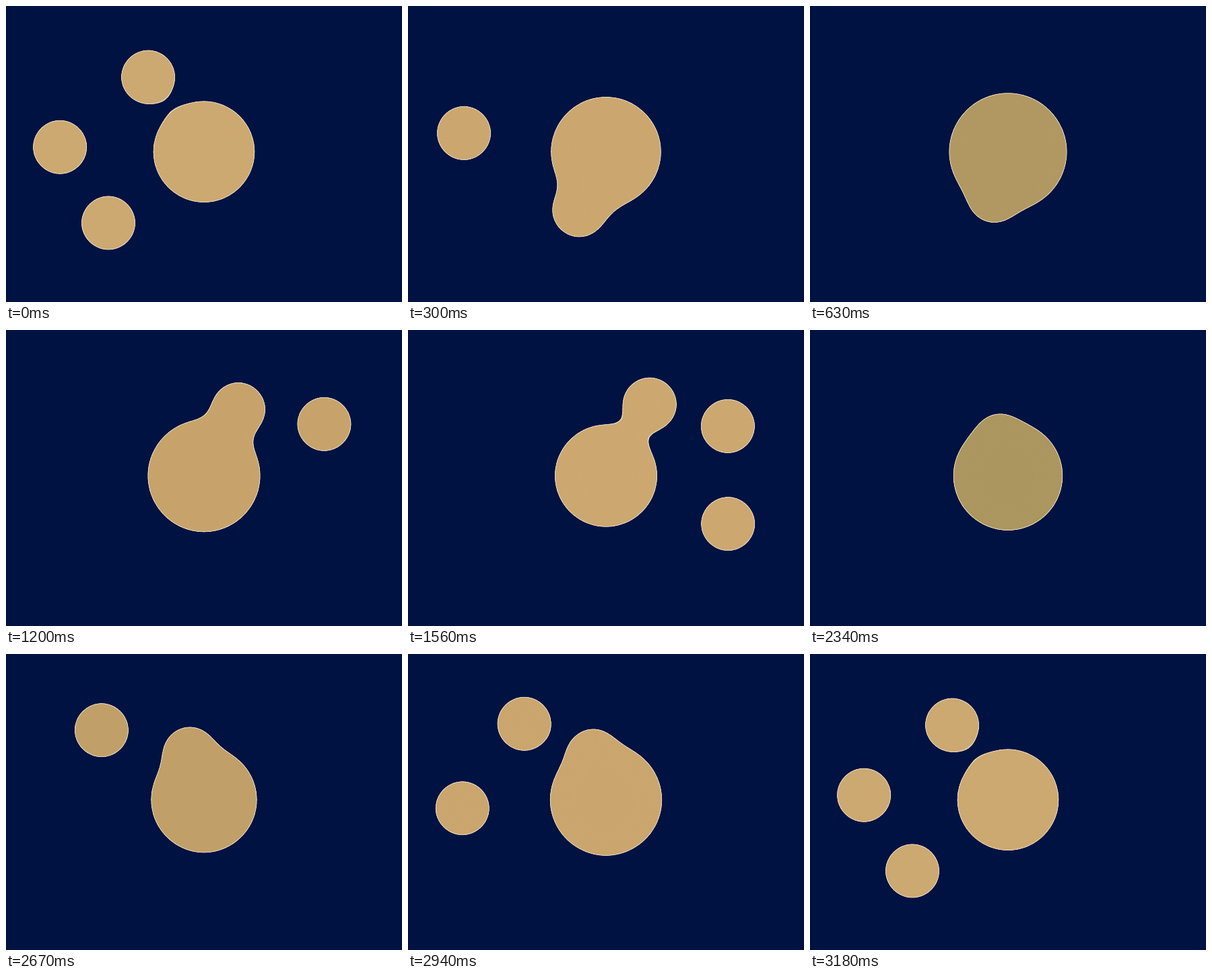
An HTML page for the animation above (3210 ms loop, 588 by 440 pixels).

```html
<!DOCTYPE html>
<html lang="en">
<head>
<meta charset="utf-8">
<title>Gooey orbit</title>
<style>
  html, body { margin: 0; width: 100%; height: 100%; overflow: hidden; background: #001242; }
  svg { display: block; }
</style>
</head>
<body>
<svg width="588" height="440" viewBox="0 0 588 440">
  <!-- Blur, then cut the alpha twice: a pale rim just outside the body -->
  <filter id="goo" filterUnits="userSpaceOnUse" x="0" y="0" width="588" height="440"
          color-interpolation-filters="sRGB">
    <feGaussianBlur stdDeviation="15" result="soft"/>
    <feColorMatrix in="soft" result="rim"
      values="0 0 0 0 .92  0 0 0 0 .86  0 0 0 0 .74  0 0 0 60 -27.9"/>
    <feColorMatrix in="soft" result="body"
      values="1 0 0 0 0  0 1 0 0 0  0 0 1 0 0  0 0 0 60 -29.5"/>
    <feMerge><feMergeNode in="rim"/><feMergeNode in="body"/></feMerge>
  </filter>
  <g id="blobs" filter="url(#goo)">
    <circle id="core" cx="294" cy="216.7"/>
    <circle class="ball" r="41.7"/>
    <circle class="ball" r="41.7"/>
    <circle class="ball" r="41.7"/>
  </g>
</svg>
<script>
const LOOP = 3210, STEP = 30, CYCLE = LOOP - STEP, HALF = CYCLE / 2;

// Each ball rounds the right lobe, then the left one; a higher power starts slower
const trips = [
  { power: 1, right: { start: 595, span: 1580 }, left: { start: 2239, span: 1350 } },
  { power: 2, right: { start: 519, span: 1670 }, left: { start: 2246, span: 1332 } },
  { power: 3, right: { start: 525, span: 1800 }, left: { start: 2155, span: 1714 } }
];

const mod = (a, n) => ((a % n) + n) % n;
const bump = (t, peak, width) => Math.exp(-(((t - peak) / width) ** 2));

function progress(trip, t) {
  const u = mod(t - trip.start, CYCLE) / trip.span;
  return u < 1 ? u : 0;
}

// Lobes are ellipses that touch at the core; angle 0 is the core, going up first
function place({ power, right, left }, t) {
  const r = progress(right, t), l = progress(left, t);
  const angle = 2 * Math.PI * Math.max(r, l) ** power;
  const reach = r > l ? 102.5 : -107;
  return [294 + reach * (1 - Math.cos(angle)), 215.7 - 113 * Math.sin(angle)];
}

const blobs = document.getElementById("blobs");
const core = document.getElementById("core");
const balls = document.querySelectorAll(".ball");

function draw(now) {
  const t = Math.floor((now % LOOP) / STEP) * STEP % CYCLE;
  balls.forEach((ball, i) => {
    const [x, y] = place(trips[i], t);
    ball.setAttribute("cx", x);
    ball.setAttribute("cy", y);
  });

  // The core swells as balls arrive and again as they leave; it is darkest between
  const beat = t % HALF;
  core.setAttribute("r", 75.6 + 15 * bump(beat, 520, 240) + 9.5 * bump(beat, 1270, 185));
  const q = beat / 740, dark = 1.1 * (q * Math.exp(1 - q)) ** 13, tint = dark ** .6;
  blobs.setAttribute("fill", `rgb(${204 - 29 * dark}, ${169 - 18 * tint}, ${113 - 16 * tint})`);
}

const start = performance.now();
function tick() {
  draw(performance.now() - start);
  requestAnimationFrame(tick);
}
tick();
</script>
</body>
</html>
```
